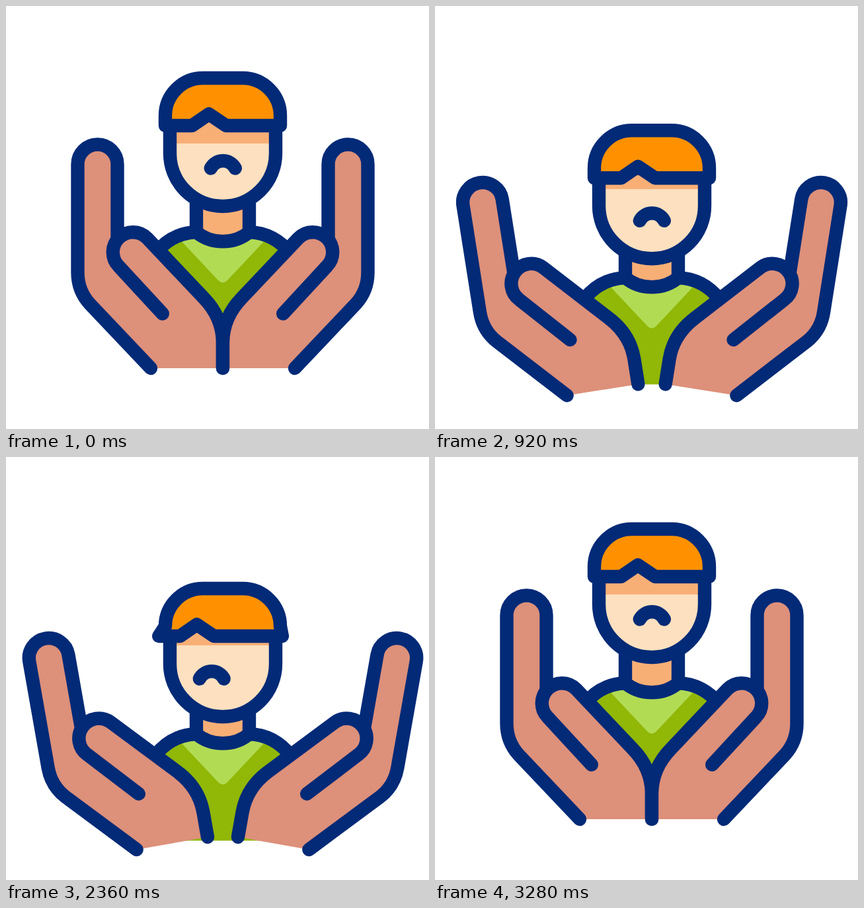
An HTML page for the animation above (3620 ms loop, 640x640 px).

```html
<!DOCTYPE html>
<html lang="en">
<head>
<meta charset="utf-8">
<title>Caring hands</title>
<style>
  html, body { margin: 0; width: 100%; height: 100%; overflow: hidden; background: #fff; }
  svg { display: block; width: 100%; height: 100%; }
  .line { fill: none; stroke: #032a77; stroke-width: 20.4; stroke-linecap: round; stroke-linejoin: round; }
</style>
</head>
<body>
<svg viewBox="0 0 640 640">
  <g id="body">
    <path fill="#f8af76" d="M288 270H368V342C346 361 310 361 288 342Z"/>
    <path fill="#91b707" d="M288 342C262 343 242 354 226 374V503.5H430V374C414 354 394 343 368 342C346 361 310 361 288 342Z"/>
    <path fill="#b2db54" d="M258 348L321.500 415.500Q328 421.500 334.500 415.500L398 348L368 342C346 361 310 361 288 342Z"/>
    <path class="line" d="M288 270V342C310 361 346 361 368 342V270M288 342C262 343 242 354 226 374M368 342C394 343 414 354 430 374"/>
  </g>
  <g id="head">
    <path fill="#fde0bf" d="M248 170V223A80 80 0 0 0 408 223V170Z"/>
    <rect id="shade" fill="#f8af76" x="248" y="160" width="160" height="48"/>
    <path class="line" d="M248 181V223A80 80 0 0 0 408 223V181"/>
    <path id="hair" class="line" style="fill:#ff9100"/>
    <path id="mouth" class="line" d="M309.800 245.500C318 230.500 338.600 230.500 346.800 245.500"/>
  </g>
  <g id="hand">
    <path fill="#dd907a" d="M219 548L127 451C115 438 108.500 421 108.500 403V239.500A30 30 0 0 1 168.500 239.500V353A30 30 0 0 1 213.700 351.400L299 441.500C318 461 328 483 328 510V548Z"/>
    <path class="line" d="M219 548L127 451C115 438 108.500 421 108.500 403V239.500A30 30 0 0 1 168.500 239.500V353"/>
    <path class="line" d="M236.800 465.500L170.300 393.500A30 30 0 0 1 213.700 351.400L299 441.500C318 461 328 483 328 510V548"/>
  </g>
  <use href="#hand" transform="translate(656) scale(-1 1)"/>
</svg>
<script>
  const LOOP = 3620;
  const $ = id => document.getElementById(id);

  const ease = (t, from, to) => {
    const u = Math.min(1, Math.max(0, (t - from) / (to - from)));
    return u * u * (3 - 2 * u);
  };
  const mix = (a, b, k) => a + (b - a) * k;

  // Offsets: left hair tip, right hair tip, fringe, mouth
  const REST = [0, 0, 0, 0];
  const LEFT = [-12, 0, -29, -27];
  const RIGHT = [0, 16, 30, 28];
  const LOOKS = [REST, LEFT, RIGHT, LEFT, RIGHT, LEFT, REST];
  const LOOK_START = 1100, LOOK_STEP = 800 / 3;

  function lookAt(t) {
    const pos = Math.min(LOOKS.length - 1, Math.max(0, (t - LOOK_START) / LOOK_STEP));
    const i = Math.min(LOOKS.length - 2, Math.floor(pos));
    const k = ease(pos, i, i + 1);
    return LOOKS[i].map((v, n) => mix(v, LOOKS[i + 1][n], k));
  }

  function draw(t) {
    const open = ease(t, 200, 1100) - ease(t, 2495, 3280);
    const drop = 77 * open;
    const nod = 13 * (ease(t, 500, 1100) - ease(t, 2433, 2900));
    const [l, r, fringe, mouth] = lookAt(t);

    $('hand').setAttribute('transform',
      `translate(${-23 * open} ${27 * open}) rotate(${-10 * open} 328 548)`);
    $('body').setAttribute('transform', `translate(0 ${drop})`);
    $('head').setAttribute('transform', `translate(0 ${drop + nod})`);
    $('shade').setAttribute('height', 48 - nod);
    $('mouth').setAttribute('transform', `translate(${mouth})`);
    $('hair').setAttribute('d',
      `M${241 + l} 181L241 166A57 57 0 0 1 298 109H358A57 57 0 0 1 415 166L${415 + r} 181` +
      `H${333 + fringe}L${307 + fringe} 163.5L${281.5 + fringe} 181Z`);
  }

  const start = performance.now();
  function tick() {
    draw((performance.now() - start) % LOOP);
    requestAnimationFrame(tick);
  }
  tick();
</script>
</body>
</html>
```
